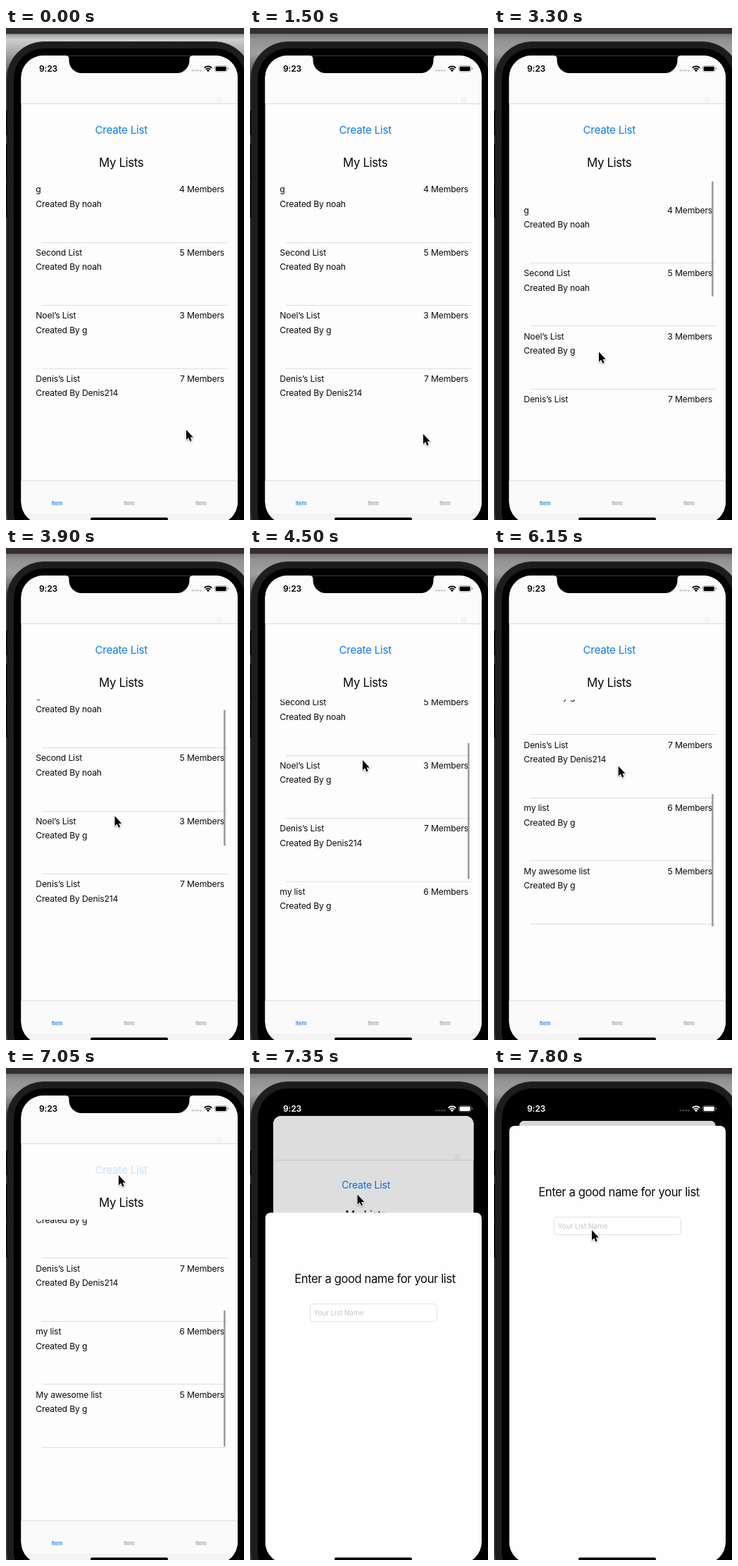
An HTML page with a canvas for the animation above (8 s loop, 338x698 px).

```html
<!DOCTYPE html>
<html lang="en">
<head>
<meta charset="utf-8">
<title>My Lists</title>
<style>
html, body { margin: 0; width: 100%; height: 100%; overflow: hidden; background: #aaa; }
canvas { display: block; width: 338px; height: 698px; }
</style>
</head>
<body>
<canvas id="stage" width="338" height="698"></canvas>
<script>
const ctx = document.getElementById('stage').getContext('2d');
const LOOP = 8000, STEP = 150, LAST = 7800;
const FONT = 'Inter, "Liberation Sans", sans-serif';
const SCREEN = { x: 21.5, y: 39.3, w: 307.5, h: 664, r: 31 };
const LIST = { x: 42, y: 215, w: 272, h: 324, row: 89.5 };
const BLUE = '#0a7cff', INK = '#0b0b0b';

const rows = [
  ['g', 'noah', 4],
  ['Second List', 'noah', 5],
  ['Noel’s List', 'g', 3],
  ['Denis’s List', 'Denis214', 7],
  ['my list', 'g', 6],
  ['My awesome list', 'g', 5]
];
const maxScroll = rows.length * LIST.row - LIST.h;

// Pointer tip: time, x, y
const path = [
  [0, 256, 570], [300, 246, 576], [1500, 246, 576], [2100, 205, 547],
  [2250, 205, 547], [2700, 152, 400.5], [3300, 149, 459.5], [4500, 160, 301],
  [4950, 172, 466], [5550, 178, 340], [5850, 178, 322], [6000, 178, 322],
  [6900, 160, 152], [7050, 160, 152], [7800, 139, 230]
];

const clamp = v => Math.max(0, Math.min(1, v));
const lerp = (a, b, p) => a + (b - a) * p;
const smooth = p => p * p * (3 - 2 * p);

function pointerAt(t) {
  let i = 0;
  while (i < path.length - 2 && t >= path[i + 1][0]) i++;
  const a = path[i], b = path[i + 1];
  const p = smooth(clamp((t - a[0]) / (b[0] - a[0])));
  return { x: lerp(a[1], b[1], p), y: lerp(a[2], b[2], p) };
}

const rubber = d => LIST.h * (1 - 1 / (d * 0.55 / LIST.h + 1));

function stretch(raw) {
  if (raw < 0) return -rubber(-raw);
  return raw > maxScroll ? maxScroll + rubber(raw - maxScroll) : raw;
}

// Two drags, then the list springs back to its end.
function scrollAt(t) {
  if (t < 2700) return 0;
  const firstDrag = u => 400.5 - pointerAt(u).y;
  if (t <= 4500) return stretch(firstDrag(t));
  const held = firstDrag(4500);
  if (t < 4950) return held;
  const secondDrag = u => stretch(held + 466 - pointerAt(u).y);
  if (t <= 6000) return secondDrag(t);
  return lerp(maxScroll, secondDrag(6000), Math.exp((6000 - t) / 130));
}

function box(x, y, w, h, r, fill, stroke, line = 1) {
  ctx.beginPath();
  ctx.roundRect(x, y, w, h, r);
  if (fill) { ctx.fillStyle = fill; ctx.fill(); }
  if (stroke) { ctx.strokeStyle = stroke; ctx.lineWidth = line; ctx.stroke(); }
}

function rect(x, y, w, h, fill) {
  ctx.fillStyle = fill;
  ctx.fillRect(x, y, w, h);
}

function text(str, x, y, size, { color = INK, align = 'left', weight = 400, track = -0.014 } = {}) {
  ctx.font = `${weight} ${size}px ${FONT}`;
  ctx.letterSpacing = `${size * track}px`;
  ctx.textAlign = align;
  ctx.fillStyle = color;
  ctx.fillText(str, x, y);
}

function drawPhone(t) {
  const shades = t < 1500
    ? ['#989898', '#cfcfcf', '#a6a6a6', '#606060']
    : ['#767676', '#929292', '#a0a0a0', '#565656'];
  const back = ctx.createLinearGradient(0, 8, 0, 64);
  [0, 0.15, 0.5, 1].forEach((stop, i) => back.addColorStop(stop, shades[i]));
  rect(0, 0, 338, 698, back);
  rect(0, 0, 338, 8, '#352d30');
  rect(0, 8, 338, 1, '#6f6a6c');
  box(1, 19.5, 348, 720, 53, '#1d1d1d', '#303030');
  box(11, 29, 329, 700, 43, '#000');
  for (const [y, h] of [[117, 35], [164, 55], [220, 49]]) rect(0, y, 2, h, '#0c0c0c');
}

function drawList(t) {
  const scroll = scrollAt(t);
  ctx.save();
  ctx.beginPath();
  ctx.rect(LIST.x - 1, LIST.y, LIST.w + 1, LIST.h);
  ctx.clip();
  rows.forEach(([name, owner, count], i) => {
    const y = LIST.y + i * LIST.row - scroll;
    text(name, 42.3, y + 18.2, 12.2);
    text(`${count} Members`, 310.1, y + 18.2, 12.2, { align: 'right' });
    text(`Created By ${owner}`, 42.3, y + 38.7, 12.2);
    rect(51, Math.floor(y + LIST.row - 0.5), 263, 1, '#dedede');
  });
  const alpha = clamp((t - 2550) / 150) * clamp((7350 - t) / 300);
  if (alpha > 0) {
    const inside = Math.max(0, Math.min(maxScroll, scroll));
    const over = Math.abs(scroll - inside);
    const top = 217.5 + inside / maxScroll * 126.5 + (scroll > maxScroll ? over : 0);
    ctx.globalAlpha = alpha;
    box(309.2, top, 2.4, 193 - over, 1.2, '#969696');
  }
  ctx.restore();
}

function drawPage(t) {
  rect(21, 39, 309, 665, '#fdfdfd');
  rect(21, 39, 309, 68, '#fbfbfb');
  rect(299, 98, 9, 9, '#f4f4f4');
  rect(21, 107, 309, 1, '#dadada');
  text('Create List', 163.7, 150.3, 15.1, {
    align: 'center', color: t === 7050 ? '#c7e0ff' : BLUE
  });
  text('My Lists', 163.6, 196.8, 16.9, { align: 'center', track: -0.024 });
  drawList(t);
  rect(21, 642, 309, 62, '#fafafa');
  rect(21, 642, 309, 1, '#d9d9d9');
  rect(21, 689, 309, 15, '#f3f3f3');
  [72.5, 175, 277].forEach((x, i) =>
    text('Item', x, 676.5, 7.4, { align: 'center', weight: 600, track: 0, color: i ? '#a0a0a0' : '#2588f7' }));
}

function drawSheet(p) {
  ctx.save();
  ctx.translate(0, lerp(621, 0, p));
  box(SCREEN.x, 82, SCREEN.w, 640, 8, '#fefefe');
  text('Enter a good name for your list', 177.5, 182, 16.6, { align: 'center', track: -0.024 });
  box(85.5, 211.5, 180, 25, 4, '#fff', '#e1e1e1');
  text('Your List Name', 90.5, 227.5, 10.2, { color: '#c5c5c7' });
  ctx.restore();
}

function drawNotch() {
  ctx.fillStyle = '#000';
  ctx.beginPath();
  ctx.moveTo(85, 38);
  ctx.lineTo(85, 39.3);
  ctx.quadraticCurveTo(89.5, 39.3, 89.5, 44);
  ctx.arcTo(89.5, 64, 110, 64, 18);
  ctx.arcTo(260.5, 64, 260.5, 44, 18);
  ctx.lineTo(260.5, 44);
  ctx.quadraticCurveTo(260.5, 39.3, 265, 39.3);
  ctx.lineTo(265, 38);
  ctx.fill();
}

function drawStatus(dark) {
  const ink = dark ? '#fff' : '#000';
  const faint = dark ? '#4a4a4a' : '#c4c4c4', rim = dark ? '#777' : '#999';
  text('9:23', 47, 62.3, 12, { weight: 600, color: ink, track: -0.01 });
  for (let i = 0; i < 4; i++) box(263.6 + i * 3.7, 59, 2.6, 2.6, 1.3, faint);
  ctx.strokeStyle = ink;
  ctx.lineWidth = 1.8;
  for (const r of [7.6, 4.7]) {
    ctx.beginPath();
    ctx.arc(287, 62, r, -Math.PI * 0.75, -Math.PI * 0.25);
    ctx.stroke();
  }
  ctx.fillStyle = ink;
  ctx.beginPath();
  ctx.moveTo(287, 62.3);
  ctx.arc(287, 62.3, 3, -Math.PI * 0.75, -Math.PI * 0.25);
  ctx.fill();
  box(296.5, 53.5, 17.5, 8.5, 2.4, null, rim, 0.8);
  box(297.7, 54.7, 15, 6.2, 1.4, ink);
  box(315, 56.2, 1.2, 3, 0.6, rim);
}

function drawPointer({ x, y }) {
  ctx.save();
  ctx.translate(x, y);
  ctx.scale(0.93, 0.95);
  ctx.beginPath();
  [[0, 0], [0, 15], [3.5, 11.8], [5.8, 17], [8.2, 16], [6, 11], [10.5, 11]]
    .forEach(([px, py]) => ctx.lineTo(px, py));
  ctx.closePath();
  ctx.shadowColor = 'rgba(0,0,0,.35)';
  ctx.shadowBlur = 2;
  ctx.shadowOffsetY = 1;
  ctx.lineJoin = 'round';
  ctx.lineWidth = 2;
  ctx.strokeStyle = '#fff';
  ctx.stroke();
  ctx.shadowColor = 'transparent';
  ctx.fillStyle = '#000';
  ctx.fill();
  ctx.restore();
}

function draw(t) {
  const p = 1 - (1 - clamp((t - 7100) / 600)) ** 3;
  const { x, y, w, h, r } = SCREEN;
  drawPhone(t);
  ctx.save();
  ctx.beginPath();
  ctx.roundRect(x, y, w, h, r);
  ctx.clip();
  if (p > 0) rect(x, y, w, h, '#000');

  ctx.save();
  const scale = lerp(1, 0.906, p), mid = x + w / 2;
  ctx.translate(mid, lerp(y, 75, p));
  ctx.scale(scale, scale);
  ctx.translate(-mid, -y);
  if (p > 0) {
    ctx.beginPath();
    ctx.roundRect(x, y, w, h, lerp(r, 8, p));
    ctx.clip();
  }
  drawPage(t);
  rect(x, y, w, h, `rgba(0,0,0,${0.15 * p})`);
  ctx.restore();

  if (p > 0) drawSheet(p);
  drawNotch();
  drawStatus(p > 0.3);
  box(120, 694.5, 110, 4, 2, '#000');
  ctx.restore();
  drawPointer(pointerAt(t));
}

function tick() {
  const now = performance.now() % LOOP;
  draw(Math.min(Math.floor(now / STEP) * STEP, LAST));
  requestAnimationFrame(tick);
}
tick();
</script>
</body>
</html>
```
